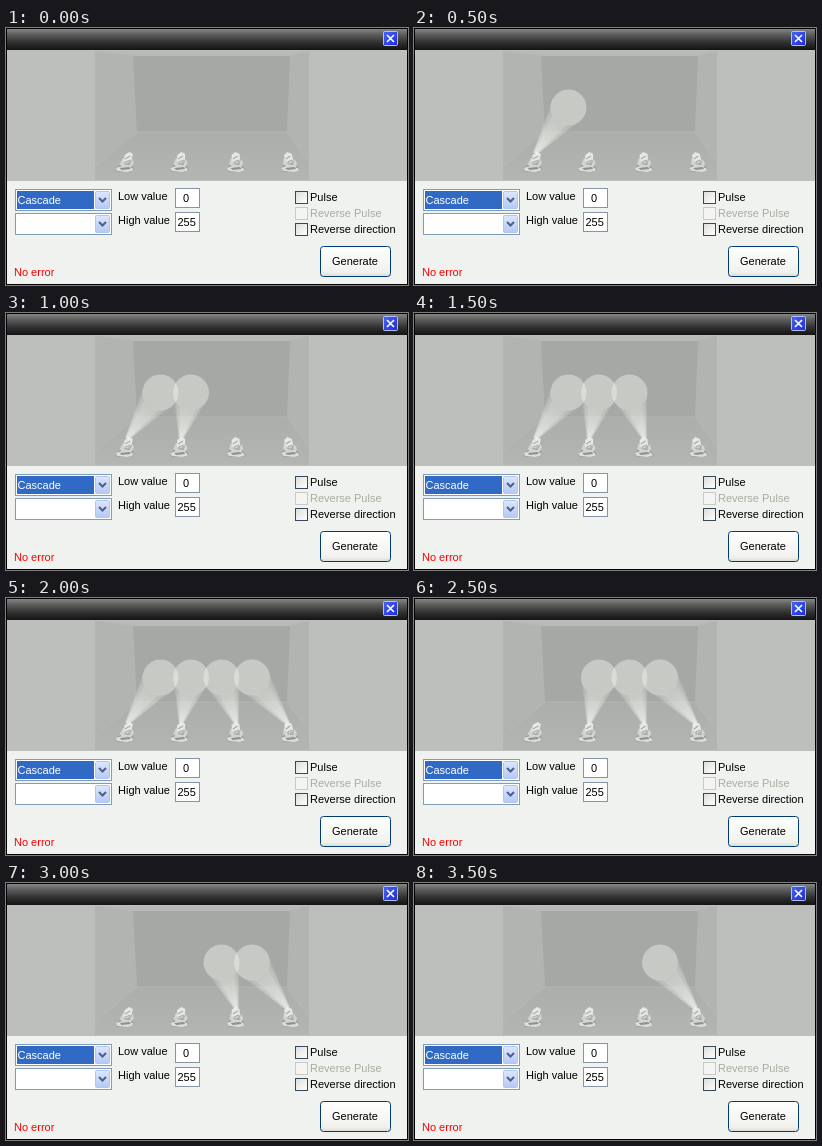
Write an HTML page that moves like this. It is 402 by 257 pixels and loops after 4000 ms.

```html
<!DOCTYPE html>
<html lang="en">
<head>
<meta charset="utf-8">
<style>
  html, body { margin: 0; width: 100%; height: 100%; overflow: hidden; background: #f0f2ef; }
  svg { display: block; width: 402px; height: 257px; font: 11px "Liberation Sans", Arial, sans-serif; }
  .sharp { shape-rendering: crispEdges; }
  .field { fill: #fff; stroke: #7f9db9; }
  .value { fill: #fff; stroke: #8496a5; }
  .check { fill: url(#inset); stroke: #344a5c; }
</style>
</head>
<body>
<svg viewBox="0 0 402 257">
  <defs>
    <linearGradient id="title" x2="0" y2="1">
      <stop stop-color="#8c8e8c"/><stop offset=".3" stop-color="#5c5e5c"/>
      <stop offset=".65" stop-color="#303130"/><stop offset="1" stop-color="#121312"/>
    </linearGradient>
    <linearGradient id="floor" x2="0" y2="1">
      <stop stop-color="#acaeab"/><stop offset="1" stop-color="#b3b5b2"/>
    </linearGradient>
    <linearGradient id="drop" x2="0" y2="1">
      <stop stop-color="#dce7fe"/><stop offset="1" stop-color="#b5c9f5"/>
    </linearGradient>
    <linearGradient id="button" x2="0" y2="1">
      <stop stop-color="#fff"/><stop offset=".85" stop-color="#f1f2ee"/><stop offset="1" stop-color="#dcdcd4"/>
    </linearGradient>
    <linearGradient id="inset" x2="1" y2="1">
      <stop stop-color="#dcdeda"/><stop offset="1" stop-color="#fff"/>
    </linearGradient>
    <linearGradient id="close" x2="1" y2="1">
      <stop stop-color="#4a64f4"/><stop offset="1" stop-color="#1a2cd8"/>
    </linearGradient>
    <g id="lamp">
      <path fill="#999b98" d="M-9-4L-4-8 5-8 9-4 7 0-7 0z"/>
      <path fill="#dcdedb" d="M-9-4L-3-6 8-4 8-1 3 0-7-1z"/>
      <path fill="#8f918e" d="M-5-4L4-5 6-3-3-2z"/>
      <path fill="#d2d4d1" d="M-6-8L-4-14 0-12-2-8 4-7 6-13 8-9 6-5-3-5z"/>
      <path fill="#e6e8e5" d="M-3-17L1-20 5-18 5-12 1-9-3-11z"/>
      <path fill="none" stroke="#a6a8a5" d="M-2-13L3-16M-1-10L4-12"/>
    </g>
    <g id="dropdown">
      <rect class="field sharp" x="9.5" y="161.5" width="96" height="21"/>
      <rect x="89.5" y="163.5" width="14" height="17" rx="1" fill="url(#drop)" stroke="#b3c5ef"/>
      <path fill="none" stroke="#4d6185" stroke-width="2" d="M93 170l3.5 3.5 3.5-3.5"/>
    </g>
  </defs>

  <rect width="402" height="257" fill="#f0f2ef"/>
  <rect y="22" width="402" height="131" fill="#bdbfbc"/>
  <rect width="402" height="22" fill="url(#title)"/>

  <rect x="89" y="23" width="214" height="129" fill="#b4b6b3"/>
  <path fill="#b8bab7" d="M89 23H303L284 28H127z"/>
  <path fill="#b2b4b1" d="M89 23L127 28 131 104 89 139zM303 23L284 28 281 104 303 134z"/>
  <path fill="url(#floor)" d="M131 104H281L303 134V152H89V139z"/>
  <path fill="#a6a8a5" d="M127 28H284L281 104H131z"/>
  <path fill="none" stroke="#babcb9" stroke-width=".5" d="M89 139L131 104H281L303 134"/>
  <g id="lamps"></g>
  <g id="beams"></g>

  <use href="#dropdown"/>
  <use href="#dropdown" y="24"/>
  <g class="sharp">
    <rect x="11" y="163" width="77" height="18" fill="#316ac5"/>
    <rect class="value" x="169.5" y="160.5" width="24" height="19"/>
    <rect class="value" x="169.5" y="184.5" width="24" height="19"/>
    <rect class="check" x="289.5" y="163.5" width="12" height="12"/>
    <rect x="289.5" y="179.5" width="12" height="12" fill="#f4f5f2" stroke="#c9c9bf"/>
    <rect class="check" x="289.5" y="195.5" width="12" height="12"/>
  </g>

  <rect x="314.5" y="218.5" width="70" height="30" rx="3" fill="url(#button)" stroke="#003c74"/>
  <rect x="377.5" y="3.5" width="14" height="14" rx="1" fill="url(#close)" stroke="#b4c0f4"/>
  <path stroke="#fff" stroke-width="1.6" d="M381 7l7 7m0-7l-7 7"/>

  <text x="11.5" y="176" fill="#fff">Cascade</text>
  <text x="112" y="172">Low value</text>
  <text x="112" y="196">High value</text>
  <text x="177" y="174">0</text>
  <text x="171.5" y="198">255</text>
  <text x="304" y="173">Pulse</text>
  <text x="304" y="189" fill="#aaaca0">Reverse Pulse</text>
  <text x="304" y="205">Reverse direction</text>
  <text x="326" y="237">Generate</text>
  <text x="8" y="248" fill="#f00">No error</text>
  <rect class="sharp" x=".5" y=".5" width="401" height="256" fill="none" stroke="#000"/>
</svg>
<script>
  const STEP = 500, LOOP = 4000, RADIUS = 17.8, SPOT_Y = 79.5, TIP_Y = 125.5;
  const GLOW = '#f4f6f0';
  // Lamp centre, beam tip and spot centre along x
  const lights = [
    { base: 118, tip: 121, spot: 154.5 },
    { base: 173, tip: 175, spot: 185 },
    { base: 230, tip: 230.5, spot: 215.5 },
    { base: 285, tip: 282, spot: 246 },
  ];
  const lamps = document.getElementById('lamps');
  const beams = document.getElementById('beams');

  function beamMarkup({ tip, spot }, i) {
    const dx = tip - spot, dy = TIP_Y - SPOT_Y;
    const angle = Math.atan2(dy, dx), spread = Math.acos(RADIUS / Math.hypot(dx, dy));
    const point = (x, y, r, a) => `${x + r * Math.cos(a)} ${y + r * Math.sin(a)}`;
    // Nested cones give the beam its soft edges
    const cone = width => {
      const edge = side => point(spot, SPOT_Y, RADIUS, angle + side * spread * width);
      const end = side => point(tip, TIP_Y, 2.5 * width, angle + side * Math.PI / 2);
      return `<path fill="url(#cone${i})"
        d="M${end(-1)}L${edge(-1)}A${RADIUS} ${RADIUS} 0 0 1 ${edge(1)}L${end(1)}z"/>`;
    };
    return `<linearGradient id="cone${i}" gradientUnits="userSpaceOnUse"
        x1="${tip}" y1="${TIP_Y}" x2="${spot}" y2="${SPOT_Y}">
        <stop stop-color="${GLOW}" stop-opacity=".38"/>
        <stop offset=".35" stop-color="${GLOW}" stop-opacity=".23"/>
        <stop offset="1" stop-color="${GLOW}" stop-opacity=".08"/>
      </linearGradient>
      ${[.9, .65, .4].map(cone).join('')}
      <circle cx="${spot}" cy="${SPOT_Y}" r="${RADIUS}" fill="${GLOW}" fill-opacity=".42"
        stroke="${GLOW}" stroke-opacity=".16" stroke-width=".8"/>`;
  }

  lamps.innerHTML = lights.map(({ base, spot }) =>
    `<use href="#lamp" transform="translate(${base} 144) skewX(${(base - spot) / 3})"/>`).join('');
  beams.innerHTML = lights.map((light, i) => `<g>${beamMarkup(light, i)}</g>`).join('');

  function draw(now) {
    const step = Math.floor(now % LOOP / STEP);
    [...beams.children].forEach((beam, i) => {
      beam.style.display = step > i && step <= i + 4 ? '' : 'none';
    });
    requestAnimationFrame(() => draw(performance.now()));
  }
  draw(performance.now());
</script>
</body>
</html>
```
